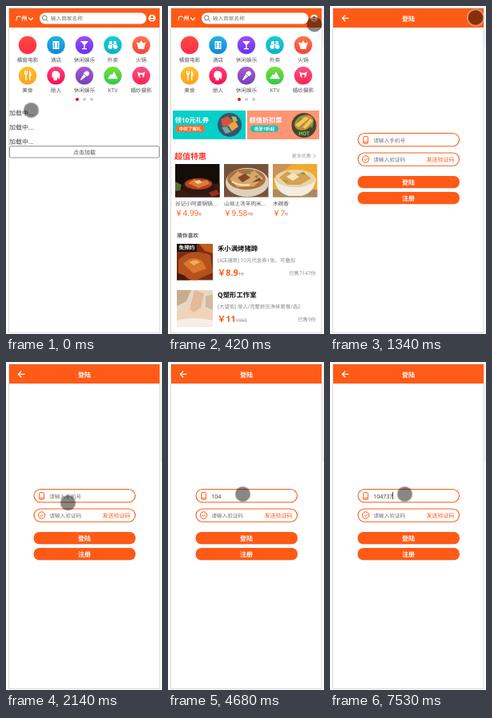
An HTML page for the animation above (8 s loop, 195 by 411 pixels).

```html
<!DOCTYPE html>
<html>
<head>
<meta charset="utf-8">
<style>
html, body { margin: 0; width: 100%; height: 100%; overflow: hidden; background: #fff; }
svg { display: block; width: 195px; height: 411px; }
text { font-family: 'Open Sans', 'Noto Sans CJK SC', 'Noto Sans CJK', sans-serif; font-size: 6.7px; fill: #555; text-rendering: geometricPrecision; }
.mid { text-anchor: middle; }
.end { text-anchor: end; }
.b { font-weight: 700; }
.w { fill: #fff; }
.grey { fill: #999; }
.hint { fill: #777; }
.load { font-size: 8px; fill: #444; }
.price { font-size: 10px; fill: #ff5a16; }
.deal { font-size: 10.8px; font-weight: 700; fill: #ff5a16; }
.was { font-size: 6.2px; font-weight: 400; fill: #999; text-decoration: line-through; }
.shop { font-size: 8.4px; font-weight: 700; fill: #111; }
.desc { font-size: 6.4px; fill: #888; }
.btn { font-size: 8px; font-weight: 700; fill: #fff; }
.line { fill: none; stroke: #fff; stroke-width: 1.3; stroke-linecap: round; stroke-linejoin: round; }
.field { fill: #fff; stroke: #ff5a16; stroke-width: 1.1; }
.mark { fill: none; stroke: #ff5a16; stroke-width: 1; }

.loading, .home, .main, .login, .hold, .tap, .strip, .typed, .caret, .hint1 { animation: 8s step-end infinite; }
.loading { animation-name: loading; }
.home { animation-name: home; }
.main { animation-name: main; }
.login { animation-name: login; }
.hold { animation-name: move; }
.tap { animation-name: tap; }
.strip { animation-name: strip; }
.typed { animation-name: typed; }
.caret { animation-name: caret; }
.hint1 { animation-name: hint; }

@keyframes loading { 0% { visibility: visible } 1.875%, 100% { visibility: hidden } }
@keyframes home { 0% { visibility: hidden } 1.875% { visibility: visible } 16.75%, 100% { visibility: hidden } }
@keyframes main { 0% { visibility: visible } 16.75%, 100% { visibility: hidden } }
@keyframes login { 0% { visibility: hidden } 16.75%, 100% { visibility: visible } }
@keyframes hint { 0% { opacity: 1 } 47.75%, 100% { opacity: 0 } }
@keyframes tap { 0% { opacity: 0 } 12.875% { opacity: 1 } 23.375%, 100% { opacity: 0 } }
@keyframes strip {
  0% { transform: scaleY(0) }
  3.75% { transform: scaleY(.41) }
  23.375%, 100% { transform: scaleY(1) }
}
@keyframes move {
  0% { transform: translate(31.5px, 130.5px) }
  1.875% { transform: translate(66.5px, 102.5px) }
  3.75% { transform: translate(126px, 60px) }
  5.25% { transform: translate(183px, 23px) }
  7.125% { transform: translate(179px, 14px) }
  11% { transform: translate(182px, 14.5px) }
  23.375% { transform: translate(100.7px, 117.5px) }
  25.25% { transform: translate(74.7px, 158px) }
  26.75% { transform: translate(77.5px, 176.5px) }
  28.625%, 100% { transform: translate(93.5px, 165.5px) }
}
@keyframes typed {
  0% { transform: translateX(0) }
  47.75% { transform: translateX(4px) }
  49.625% { transform: translateX(8px) }
  53.125% { transform: translateX(12px) }
  65.125% { transform: translateX(16px) }
  68.625% { transform: translateX(20px) }
  70.125%, 100% { transform: translateX(24px) }
}
@keyframes caret {
  0%, 38.75%, 58.5%, 75.5%, 87.5% { opacity: 0 }
  31.75%, 44.25%, 65.125%, 82.125%, 94.125%, 100% { opacity: 1 }
}
</style>
</head>
<body>
<svg viewBox="0 0 195 411">
  <defs>
    <clipPath id="dish"><rect width="55.5" height="41.5"/></clipPath>
    <clipPath id="thumb"><rect width="45" height="45.5"/></clipPath>
  </defs>
  <rect width="195" height="411" fill="#fff"/>
  <rect class="strip" x="192.3" width="2.7" height="126" fill="#f2f2f2"/>
  <rect x="3.5" y="2.5" width="188.5" height="407" fill="#fff" stroke="#d8d8d8"/>
  <rect x="4" y="3" width="188" height="24" fill="#ff5a16"/>

  <g class="main">
    <text class="b w" x="12" y="18.4" style="font-size:7.2px">广州</text>
    <path class="line" d="M28.5 15l2.5 2.6 2.5-2.6"/>
    <rect x="42" y="8.5" width="133.5" height="14" rx="7" fill="#fff"/>
    <g fill="none" stroke="#666" stroke-width=".9"><circle cx="48.3" cy="14.8" r="2.9"/><path d="M50.4 17l2.2 2.2"/></g>
    <text class="hint" x="55.8" y="18.2">输入商家名称</text>
    <circle cx="182.5" cy="15.2" r="4.4" fill="#fff"/>
    <circle cx="182.5" cy="13.7" r="1.5" fill="#ff5a16"/>
    <path d="M179.7 18q2.8-3.6 5.6 0z" fill="#ff5a16"/>
    <g id="menu"></g>
    <circle cx="89" cy="117" r="2" fill="#e81010"/>
    <circle cx="98" cy="117" r="2" fill="#ccc"/>
    <circle cx="107" cy="117" r="2" fill="#ccc"/>
  </g>

  <g class="loading">
    <text class="load" x="4" y="137">加载中...</text>
    <text class="load" x="4" y="155">加载中...</text>
    <text class="load" x="4" y="173">加载中...</text>
    <rect x="4.5" y="175.5" width="187" height="14.5" rx="2" fill="#fff" stroke="#888" stroke-width=".9"/>
    <text class="mid" x="98" y="185.6" style="font-size:7px">点击加载</text>
  </g>

  <g class="home">
    <rect x="6" y="131" width="91" height="36" fill="#06cfc9"/>
    <text class="b w" x="8.5" y="145.5" style="font-size:8.3px">领10元礼券</text>
    <rect x="9.5" y="149.5" width="36.5" height="8.5" rx="4.2" fill="#ff6a28"/>
    <text class="mid b w" x="27.7" y="155.8" style="font-size:5.6px">中奖了解礼</text>
    <circle cx="77" cy="149" r="15" fill="#34566c"/>
    <path d="M66 142l8-4 8 6-4 6-10 1z" fill="#d0553c"/>
    <path d="M75 149l9-5 4 7-8 6z" fill="#e9a545"/>
    <path d="M67 152l7-1 5 7-7 2z" fill="#72a8a3"/>
    <path d="M79 138l6 1 2 5-5 1z" fill="#a9bf66"/>

    <rect x="99" y="131" width="90" height="36" fill="#ff9574"/>
    <text class="b w" x="101.5" y="145.5" style="font-size:8.2px">超值折扣菜</text>
    <rect x="103" y="149.5" width="35" height="8.5" rx="4.2" fill="#21bfae"/>
    <text class="mid b w" x="120.5" y="155.8" style="font-size:5.6px">低至1折起</text>
    <circle cx="170" cy="149.5" r="15.5" fill="#454534"/>
    <ellipse cx="170" cy="146" rx="12.5" ry="9" fill="#bb8a35" transform="rotate(-25 170 146)"/>
    <path d="M159 149l12-10 6 1-14 12zM168 152l10-11 3 3-9 10z" fill="#f0c55c"/>
    <path d="M161 143l5-3 2 2-6 4zM177 150l5-3-2 6z" fill="#6f9c3e"/>
    <text class="mid b" x="170" y="162" style="font-size:6.5px;fill:#7de03c">HOT</text>

    <text class="b" x="8" y="191.8" style="font-size:10px;fill:#f5342c">超值特惠</text>
    <text class="grey" x="154.7" y="190.2" style="font-size:6px">更多优惠</text>
    <path d="M182 185.8l2.4 2.4-2.4 2.4" fill="none" stroke="#999" stroke-width=".9"/>

    <g transform="translate(9 198)" clip-path="url(#dish)">
      <rect width="56" height="42" fill="#150d0a"/>
      <path d="M0 32l56-8v18H0z" fill="#3b1a10"/>
      <ellipse cx="29" cy="28" rx="20" ry="11" fill="#2b1914"/>
      <ellipse cx="29" cy="25" rx="17" ry="7" fill="#b8401c"/>
      <path d="M16 24l8-5 8 3 8-2 3 5-14 5z" fill="#e07a35"/>
      <path d="M24 22l6-2 4 3-6 2z" fill="#f0d3a0"/>
      <path d="M0 22l8 4-2 7-6 1z" fill="#557035"/>
      <path d="M42 36l10-4 3 6-9 3z" fill="#9a2d1a"/>
    </g>
    <g transform="translate(70 198)" clip-path="url(#dish)">
      <rect width="56" height="42" fill="#76523d"/>
      <ellipse cx="29" cy="23" rx="27" ry="18" fill="#ded0ba"/>
      <ellipse cx="28" cy="19" rx="24" ry="13" fill="#ad713f"/>
      <path d="M7 19l10-10 9 5 12-6 11 10-12 10-20 1z" fill="#d9a467"/>
      <path d="M17 17l9-5 7 5-10 6zM35 23l9-6 3 4z" fill="#81472b"/>
      <path d="M10 22q10 6 22 4" fill="none" stroke="#f3dfb5" stroke-width="2.5"/>
      <path d="M26 11l6-2 2 4zM38 15l5-1-2 4z" fill="#6d923b"/>
    </g>
    <g transform="translate(131 198)" clip-path="url(#dish)">
      <rect width="56" height="42" fill="#eeaa30"/>
      <path d="M0 0h24L8 14 0 18z" fill="#c99358"/>
      <path d="M0 32h56v10H0z" fill="#a98a65"/>
      <path d="M2 18h52q-2 18-18 22H20Q4 36 2 18z" fill="#f3ece0"/>
      <ellipse cx="28" cy="18" rx="25" ry="11" fill="#ead4a5"/>
      <path d="M8 17l10-8 10 5 10-4 10 8-14 8H18z" fill="#d6a055"/>
      <path d="M17 16l8-5 8 5-8 5z" fill="#f6e4ba"/>
      <path d="M33 12l6-2 2 4zM13 20l6 1-2 3z" fill="#7da044"/>
    </g>
    <text x="9" y="250.4">谷记小阿婆锅锅...</text>
    <text x="70" y="250.4">山坳上汤羊肉米...</text>
    <text x="131" y="250.4">木碗香</text>
    <text class="price" x="8.5" y="262.6">￥4.99<tspan class="was">6</tspan></text>
    <text class="price" x="69.5" y="262.6">￥9.58<tspan class="was">10</tspan></text>
    <text class="price" x="130.5" y="262.6">￥7<tspan class="was">9</tspan></text>

    <text class="b" x="11.3" y="289.8">猜你喜欢</text>
    <g transform="translate(11 298)" clip-path="url(#thumb)">
      <rect width="45" height="46" fill="#7c2d11"/>
      <path d="M2 20q16-16 40-6l3 22-22 10L2 40z" fill="#b5511b"/>
      <path d="M8 25q12-12 24-3l5 9-16 6z" fill="#d9772c"/>
      <path d="M16 23q7-5 13 0l-8 4z" fill="#f2ad60"/>
      <path d="M28 0h17v12l-10-3z" fill="#bf5a20"/>
      <path d="M0 36l10 4 6 6H0z" fill="#4b1b0c"/>
      <rect width="25" height="10" fill="#1c1412"/>
      <text class="b w mid" x="12.5" y="7.4" style="font-size:6.6px">免预约</text>
    </g>
    <text class="shop" x="62" y="307.2">禾小满烤猪蹄</text>
    <text class="desc" x="62" y="321.4">[4店通用] 10元代金券1张，可叠加</text>
    <text class="deal" x="61.5" y="338">￥8.9<tspan class="was">10</tspan></text>
    <text class="desc end" x="185" y="337">已售7147份</text>
    <g transform="translate(11 356)" clip-path="url(#thumb)">
      <rect width="45" height="46" fill="#e6d8c6"/>
      <path d="M0 0h18l-6 14-12 6z" fill="#c8ad8d"/>
      <path d="M0 28q16-12 26-10l19 12v16H0z" fill="#f0d3b8"/>
      <path d="M22 0l12 4-4 18-9 6-5-4z" fill="#e3b998"/>
      <path d="M0 38q20-6 45 0v8H0z" fill="#f6efe6"/>
      <path d="M36 8l9-3v20l-9-4z" fill="#d2ba9c"/>
    </g>
    <text class="shop" x="62" y="364.6">Q塑形工作室</text>
    <text class="desc" x="62" y="379.3">[大望街] 单人/完整舒压净排套餐/选2</text>
    <text class="deal" x="61.5" y="396.4">￥11<tspan class="was">1960</tspan></text>
    <text class="desc end" x="185" y="395.2">已售9份</text>
  </g>

  <g class="login">
    <path class="line" d="M23 15.3h-7.4m3.2-3.4l-3.4 3.4 3.4 3.4"/>
    <text class="btn mid" x="98" y="18.5">登陆</text>
    <rect class="field" x="35" y="159.5" width="126.5" height="16.2" rx="8.1"/>
    <rect class="mark" x="41.8" y="163.6" width="5.6" height="8.8" rx=".8"/>
    <path class="mark" d="M42 170.6h5.4"/>
    <text x="54.2" y="170.7" style="font-size:7px;fill:#333">104737</text>
    <g class="typed">
      <rect x="54.2" y="162" width="40" height="11" fill="#fff"/>
      <rect class="caret" x="54" y="163" width=".9" height="9" fill="#333"/>
    </g>
    <text class="hint hint1" x="54.2" y="170.7">请输入手机号</text>
    <rect class="field" x="35" y="184" width="126.5" height="16.2" rx="8.1"/>
    <circle class="mark" cx="44.6" cy="192" r="4.2"/>
    <path class="mark" d="M42.6 192l1.6 1.6 2.8-3"/>
    <text class="hint" x="54.2" y="194.9">请输入验证码</text>
    <text x="120.5" y="194.9" style="font-size:7px;fill:#ff5a16">发送验证码</text>
    <rect x="34.5" y="213" width="127.5" height="15.3" rx="7.2" fill="#ff5a16"/>
    <text class="btn mid" x="98" y="223.7">登陆</text>
    <rect x="34.5" y="233" width="127.5" height="15.3" rx="7.2" fill="#ff5a16"/>
    <text class="btn mid" x="98" y="243.7">注册</text>
  </g>

  <g class="hold">
    <circle r="9.5" fill-opacity=".47"/>
    <circle class="tap" r="10.2" fill="none" stroke="#cfc0b4" stroke-opacity=".65" stroke-width="1.6"/>
  </g>
</svg>
<script>
const items = [
  ['橘窗电影', '#ff4a3d', '#ff2d4a', ''],
  ['酒店', '#1fb4e8', '#1686d6', 'M-4-5h8V5h-8z'],
  ['休闲娱乐', '#a04cf5', '#6436ee', 'M-5-5H5L.7 0v4H3v1.2h-6V4h2.3V0z'],
  ['外卖', '#18cbd6', '#08b4c6', 'M-6 2a2.8 2.8 0 1 0 5.6 0a2.8 2.8 0 1 0-5.6 0M.4 2a2.8 2.8 0 1 0 5.6 0a2.8 2.8 0 1 0-5.6 0M-4-5h3v4h2v-4h3l1 5h-10z'],
  ['火锅', '#ff7650', '#f64538', 'M0-6l2 3.5 4-1-1.5 4L3.5 5h-7l-1-4.500L-6-3.500l4 1z'],
  ['美食', '#ffc02c', '#ffa21c', 'M-4-6v4l1.2 1V6h1.4V-1L0-2v-4h-1v3h-.8v-3h-.8v3H-3v-3zM2-6q3 1 2.400 6H3.400v6H2z'],
  ['丽人', '#ff3d82', '#f5124e', 'M-5 1q-1-7 4-7q6 0 6 6l-1 5-2-3-1 4h-4V3l-2-1z'],
  ['休闲娱乐', '#a85bd0', '#7440bd', 'M1-5a3 3 0 1 1 3 5l-1 1-4-4zM-1-2l3 3-6 5-1-1z'],
  ['KTV', '#7ade3c', '#2fc94a', 'M-6.500 4l4-6 1.500 1.500L1.500-5 6.500 4z'],
  ['婚纱摄影', '#ff4d88', '#f9264f', 'M-5-5l3 1.500h4l3-1.500-1 3.500a4 4 0 1 1-8 0zM0-1.500a2 2 0 1 0 .1 0z']
];
document.getElementById('menu').innerHTML = items.map(([name, top, low, icon], i) => {
  const x = 27 + 35.5 * (i % 5), y = i < 5 ? 49 : 87.3;
  return `<linearGradient id="g${i}" x2="0" y2="1"><stop stop-color="${top}"/><stop offset="1" stop-color="${low}"/></linearGradient>
    <g transform="translate(${x} ${y})"><circle r="11.2" fill="url(#g${i})"/><path d="${icon}" fill="#fff" fill-rule="evenodd"/>
    ${i == 1 ? `<path d="M-2-3v6M2-3v6" stroke="${low}" stroke-width="1.6" stroke-dasharray="1.6 .8"/>` : ''}
    <text class="mid" y="21.2">${name}</text></g>`;
}).join('');
</script>
</body>
</html>
```
